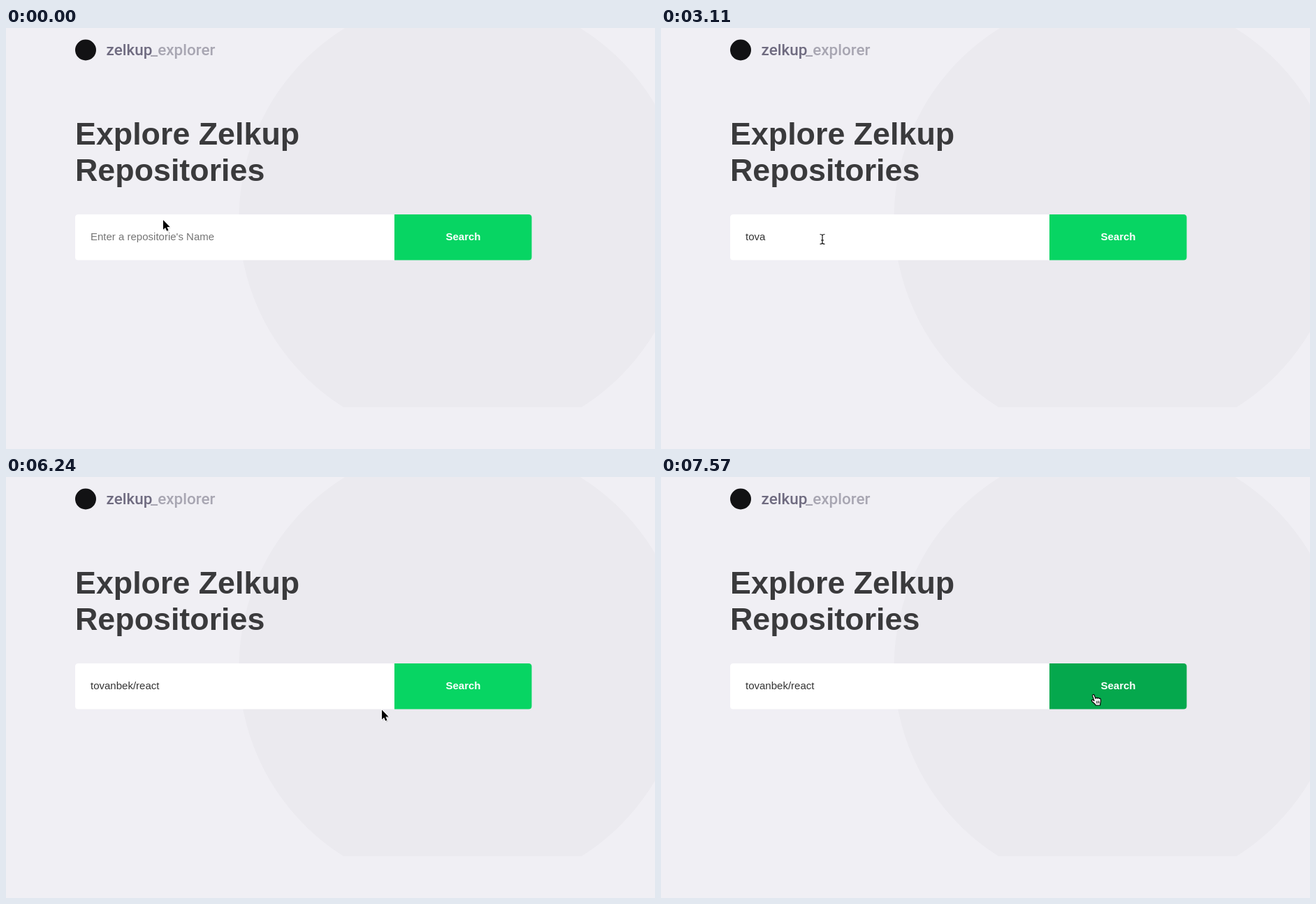
Recreate the animation shown at these times as an HTML page. Size 929x603 px, loop 8 s.

```html
<!DOCTYPE html>
<html lang="en">
<head>
<meta charset="utf-8">
<title>Repository explorer</title>
<style>
  html, body { margin: 0; width: 100%; height: 100%; overflow: hidden; background: #f0eff4; }
  svg { display: block; width: 929px; height: 603px; font-family: "Liberation Sans", Arial, sans-serif; }
  .logo { font: 500 22.5px Roboto, sans-serif; }
  .title { font-size: 44.8px; font-weight: bold; fill: #3a3a3c; }
  .field { font-size: 15px; }
</style>
</head>
<body>
<svg viewBox="0 0 929 603">
  <path d="M483 543A320 320 0 1 1 824 543Z" fill="#ebeaef"/>

  <circle cx="114" cy="31.5" r="15" fill="#121214"/>
  <text class="logo" x="143.5" y="39" fill="#6f6b80">zelkup<tspan x="207" fill="#a8a6b2">_explorer</tspan></text>

  <text class="title" x="99" y="167">Explore Zelkup</text>
  <text class="title" x="99" y="219">Repositories</text>

  <path d="M557 267H103.5Q99 267 99 271.5V328Q99 332.5 103.5 332.5H557Z" fill="#fff"/>
  <path id="button" d="M556 267H748Q752.5 267 752.5 271.5V328Q752.5 332.5 748 332.5H556Z"/>
  <text class="field" x="654.5" y="304" text-anchor="middle" font-weight="bold" fill="#fff">Search</text>
  <text class="field" id="entry" x="121" y="304"></text>
  <rect id="caret" y="291" width="1" height="17" fill="#222"/>

  <g id="arrow">
    <path d="M1 2V15.5L4.2 12.6 6.3 17.5 8.9 16.3 6.8 11.6H11Z" opacity=".18"/>
    <path d="M0 0V13.8L3.1 10.9 5.2 15.8 7.5 14.8 5.4 10H9.7Z" stroke="#fff" stroke-width="1.6" paint-order="stroke"/>
  </g>
  <path id="beam" d="M-3.5-7Q-.5-7 0-5.5Q.5-7 3.5-7M0-5.5V5.5M-3.5 7Q-.5 7 0 5.5Q.5 7 3.5 7M-2 1.5H2"
    fill="none" stroke="#111" stroke-width="1.2"/>
  <g id="hand" stroke="#000" stroke-width="1.2" stroke-linejoin="round" stroke-linecap="round">
    <path fill="#fff" d="M1.6 2.4C1.1 .7 3.5-.1 4.2 1.6L6 6.3C6.2 5 8.2 4.8 8.6 6.1 9 5 10.8 5.1 11.2 6.4 11.8 5.7 13 6.1 13.3 7.3 13.8 9.2 13.7 11 12.9 13L12.6 16H6.3C5.6 14 2.9 12.2 .8 10.2-.4 8.9 1 7.6 2.3 8.4L4.1 9.6Z"/>
    <path fill="none" stroke-width=".8" d="M7.3 10.2l.4 3M9.2 10l.3 3M11 9.8l.1 3"/>
  </g>
</svg>
<script>
const LOOP = 8000;
const PHRASE = "tovanbek/react";
const PLACEHOLDER = "Enter a repositorie's Name";

// Each track lists [start time, value...]; a value holds until the next start.
const typed = [[0, 0], [2380, 1], [2530, 2], [2670, 4], [3260, 5], [3560, 6], [3710, 7],
  [3850, 8], [4450, 9], [4750, 11], [5050, 12], [5200, 13], [5340, 14]];
const caretToggles = [1330, 1930, 2380, 3110, 3260, 4300, 4450, 5940, 6380, 6830, 7420, 7570];
const pointer = [[0, "arrow", 225, 275], [150, "beam", 219, 293], [290, "beam", 231, 301.5],
  [1040, "beam", 231, 302.5], [6090, "beam", 400, 322], [6240, "arrow", 538, 333.5],
  [6380, "hand", 587, 327], [6530, "hand", 605, 318], [6680, "hand", 613, 313],
  [6830, "hand", 616, 311]];
const buttonColor = [[0, "#07d563"], [6380, "#03c25a"], [6530, "#05a84d"]];

const el = id => document.getElementById(id);
const valueAt = (track, t) => track.findLast(step => step[0] <= t).slice(1);
const entry = el("entry"), caret = el("caret"), button = el("button");

function draw(t) {
  const [count] = valueAt(typed, t);
  entry.textContent = count ? PHRASE.slice(0, count) : PLACEHOLDER;
  entry.setAttribute("fill", count ? "#333" : "#757575");

  const textWidth = count ? entry.getComputedTextLength() : 0;
  caret.setAttribute("x", Math.floor(121.5 + textWidth));
  const caretOn = caretToggles.filter(time => time <= t).length % 2;
  caret.style.display = caretOn ? "" : "none";

  const [shape, x, y] = valueAt(pointer, t);
  for (const name of ["arrow", "beam", "hand"]) {
    el(name).style.display = name === shape ? "" : "none";
  }
  el(shape).setAttribute("transform", `translate(${x} ${y})`);
  button.setAttribute("fill", valueAt(buttonColor, t)[0]);
}

const start = performance.now();
function tick() {
  draw((performance.now() - start) % LOOP);
  requestAnimationFrame(tick);
}
tick();
</script>
</body>
</html>
```
